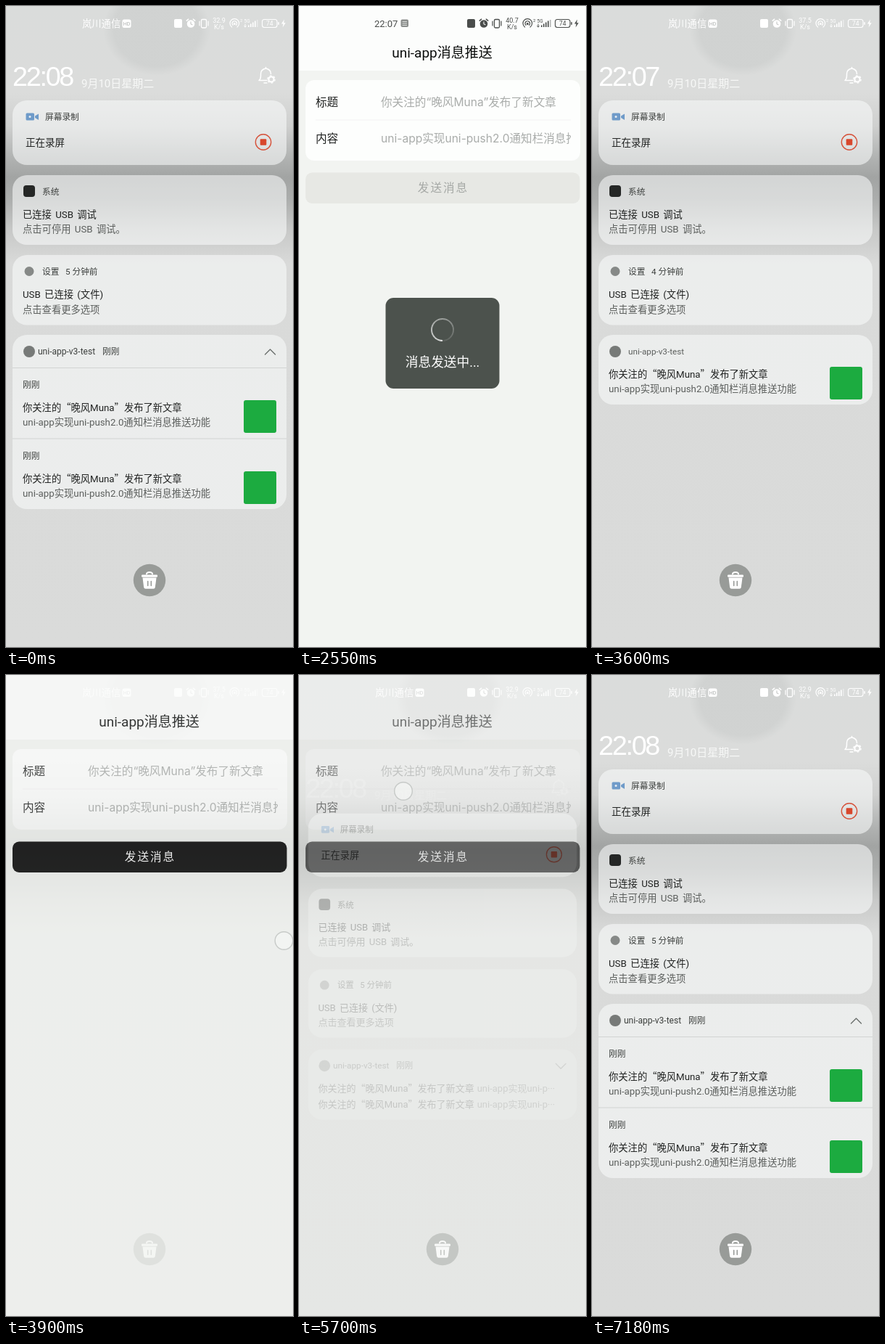
An HTML page for the animation above (7.31 s loop, 396x883 px).

```html
<!DOCTYPE html>
<html lang="zh-CN">
<head>
<meta charset="utf-8">
<title>消息推送</title>
<style>
html, body { margin: 0; width: 100%; height: 100%; overflow: hidden; background: #dadbda; }
svg { display: block; width: 100%; height: 100%; }
text { font-family: Roboto, "Noto Sans CJK SC", "Noto Sans CJK", sans-serif; white-space: pre; }
.inter { font-family: Inter, "Noto Sans CJK SC", "Noto Sans CJK", sans-serif; }
.cjk { font-family: "Noto Sans CJK SC", "Noto Sans CJK", sans-serif; }
.clock { font-family: "Liberation Sans", Arial, sans-serif; letter-spacing: -2.3px; }
.mid { text-anchor: middle; }
.end { text-anchor: end; }
</style>
</head>
<body>
<svg id="stage" viewBox="0 0 396 883" preserveAspectRatio="none"></svg>
<script>
const LOOP = 7310;
const INK = '#202221', SOFT = '#5c5f5d', HINT = '#a9acaa';
const USER = '晚风Muna', CARRIER = '岚川通信';

// Small SVG helpers
const text = (x, y, size, str, fill = INK, cls = '', more = '') =>
  `<text x="${x}" y="${y}" font-size="${size}" fill="${fill}" class="${cls}" ${more}>${str}</text>`;
const rect = (x, y, w, h, r, fill, more = '') =>
  `<rect x="${x}" y="${y}" width="${w}" height="${h}" rx="${r}" fill="${fill}" ${more}/>`;
const disc = (x, y, r, fill, more = '') => `<circle cx="${x}" cy="${y}" r="${r}" fill="${fill}" ${more}/>`;
const ring = (x, y, r, color, w, more = '') => disc(x, y, r, 'none', `stroke="${color}" stroke-width="${w}" ${more}`);
const line = (d, color, w = 1.4, more = '') =>
  `<path d="${d}" fill="none" stroke="${color}" stroke-width="${w}" stroke-linecap="round" stroke-linejoin="round" ${more}/>`;
const group = (body, more) => `<g ${more}>${body}</g>`;
const at = (x, y, body) => group(body, `transform="translate(${x} ${y})"`);

const stops = list => list.map(([y, c]) => `<stop offset="${y / 883}" stop-color="${c}"/>`).join('');
const defs = `<defs>
  <linearGradient id="wall" x2="0" y2="1">${stops([[0, '#dadcdb'], [120, '#dbdcdb'], [165, '#cfd0cf'],
    [205, '#b3b5b4'], [236, '#a2a4a3'], [265, '#abadac'], [310, '#c8c9c8'], [355, '#d9dad9'], [883, '#dadbda']])}</linearGradient>
  <radialGradient id="haze"><stop offset=".8" stop-color="#cfd1d0" stop-opacity=".85"/><stop offset="1" stop-color="#cfd1d0" stop-opacity="0"/></radialGradient>
  <clipPath id="field"><rect x="112.5" y="165" width="262.5" height="35"/></clipPath>
</defs>`;

function statusIcons(c, speed) {
  const bars = [2.5, 4.5, 6.5, 8.5].map((h, i) => rect(334 + i * 3, 29 - h, 1.6, h, 0, c)).join('');
  return rect(232, 18, 11, 12, 2, c) +
    disc(255, 24.5, 5.3, c) + line('M249.3 20.2l2.4-2M260.7 20.2l-2.4-2', c, 1.5) +
    line('M255 21.8v3l2 1', c === '#fff' ? '#c5c7c6' : '#f8f9f8', 1.1) +
    rect(269.5, 18.5, 7, 11.5, 1.5, 'none', `stroke="${c}" stroke-width="1.3"`) +
    line('M267 21v6M279 21v6', c, 1.2) +
    text(294, 22.5, 9, speed, c, 'mid') + text(294, 31.5, 9, 'K/s', c, 'mid') +
    line('M311.6 29a6.3 6.3 0 1 1 7.4 0M313 26.4a3.3 3.3 0 1 1 4.6 0', c, 1.2) + disc(315.3, 24.6, 1.5, c) +
    text(323, 22, 6, '2', c) + text(328.5, 22.5, 6.5, '5G', c) +
    line('M330 25v4M328.7 27.5l1.3 1.5 1.3-1.5', c, .9) + bars + rect(346, 19, 1.6, 10, 0, c, 'opacity=".4"') +
    rect(353.5, 18.5, 20.5, 11, 3, 'none', `stroke="${c}" stroke-width="1.1"`) +
    rect(375.3, 22, 1.5, 4, .7, c) + text(363.7, 27, 8.5, '74', c, 'mid') +
    `<path d="M384 18.5l-4 6h2.6l-1 5 4.2-6.2h-2.6z" fill="${c}"/>`;
}

// The page with its form
function spinner(turn) {
  const point = a => `${(15 * Math.cos(a)).toFixed(2)} ${(15 * Math.sin(a)).toFixed(2)}`;
  let arcs = '';
  for (let i = 0; i < 24; i++) {
    const a = Math.PI * (1 + i / 12);
    arcs += line(`M${point(a)}A15 15 0 0 1 ${point(a + Math.PI / 12)}`, '#fff', 1.9,
      `opacity="${(.8 - i * .031).toFixed(2)}" style="stroke-linecap:butt"`);
  }
  return group(arcs, `transform="translate(198 446) rotate(${turn})"`);
}

function page(s, time) {
  const base = s.keys ? '#f7f9f8' : '#f2f4f1', top = s.keys ? base : '#fcfdfc';
  const dark = '#4a4d4b';
  let out = rect(0, 0, 396, 883, 0, base) + rect(0, 0, 396, 89, 0, top);
  if (!s.panel) {
    out += text(104, 28.7, 13, '22:07', dark) +
      rect(140.5, 18.5, 10.5, 10.5, 2, '#8b8e8c') + line('M143 21.5h5.5M143 24h5.5M143 26.5h5.5', base, .8) +
      (s.sent ? disc(162, 24, 5.5, '#6a6d6b') : '') + statusIcons(dark, s.speed);
  }
  out += text(197.5, 70.5, 19, 'uni-app消息推送', '#0c0e0d', 'mid') +
    rect(9, 102, 379, 111, 12, s.keys ? base : '#fdfefd') +
    (s.keys ? '' : rect(23, 156.5, 352, 1, 0, '#f3f4f3')) +
    text(23, 137.5, 15.6, '标题') + text(23, 187.5, 15.6, '内容') +
    text(113, 137.5, 15.6, `你关注的“${USER}”发布了新文章`, HINT, 'inter') +
    group(text(s.keys ? 374.5 : 113, 187.5, 15.6, 'uni-app实现uni-push2.0通知栏消息推送功能', HINT,
      s.keys ? 'inter end' : 'inter'), 'clip-path="url(#field)"') +
    rect(9, 229.5, 378.5, 42.5, 9, s.load ? '#e7e8e4' : '#000') +
    text(199, 255.8, 15.6, '发送消息', s.load ? '#a5a8a5' : '#fff', 'mid', 'letter-spacing="2"');
  if (s.load) {
    out += rect(119.5, 402, 157, 125, 11, '#4c524d') + spinner((time - 4800) * .36) +
      text(198, 497, 17.7, '消息发送中...', '#fff', 'mid');
  }
  return out + (s.keys ? keyboard() : '');
}

function keyboard() {
  const cap = (x, y, w, fill = '#f8faf9') => rect(x, y + 1, w, 49, 5, '#cfd3d9') + rect(x, y, w, 48.5, 5, fill);
  const grey = '#c6ced8', ink = '#2b2d2f', tool = '#55585a';
  const row = (x0, y, letters, hints) => [...letters].map((ch, i) => {
    const x = x0 + i * 40;
    return cap(x - 17, y, 34.5) + text(x, y + 33.5, 20, ch, ink, 'inter mid') + text(x, y + 13.5, 10.5, hints[i], '#b7babc', 'mid');
  }).join('');
  const eye = 'M0 0q1 6 5.5 6t5.5-6M3.6 11v4M7.4 11v4';
  const bar =
    disc(372, 590, 10.5, '#fff') + disc(372, 590, 8, '#d9843f') +
    text(16, 633, 20, '，', ink, 'cjk') + text(65, 634, 20, '不能', ink) +
    disc(143, 626, 13.3, '#fbc83d') + disc(137.5, 623, 1.6, '#6b4420') + disc(148.5, 623, 1.6, '#6b4420') +
    disc(134.5, 629, 2.6, '#f6a13c') + disc(151.5, 629, 2.6, '#f6a13c') +
    line('M136.5 629.5q6.5 7.5 13 0', '#7a4a1c', 1.6) +
    text(180, 637, 22, '*', ink) + at(190, 627, line(eye, ink)) + at(209, 627, line(eye, ink)) +
    line('M202.5 636.5l2.3 2 2.3-2', ink, 1.2) +
    line('M229 632c-9 3-10-8-5-8 4 0 5 4 5 8 0-4 1-8 4.5-8 5 0 5 11-4.5 8', ink) +
    text(259.5, 634, 20, '到', ink) + line('M303.5 616v20', '#dddfe0', 1) +
    ring(327, 625, 9, tool, 1.4) + line('M333.5 631.5l3.5 3.5', tool) +
    ring(372, 626, 9.7, tool, 1.4) + line('M368.5 622.5l7 7M375.5 622.5l-7 7', tool);
  return bar + rect(0, 650, 396, 233, 0, '#e4e7ec') +
    row(18, 656, 'QWERTYUIOP', '1234567890') +
    row(38, 715, 'ASDFGHJKL', '~!@#%“”*?') +
    row(78, 774, 'ZXCVBNM', '()-_:;/') +
    cap(0, 774, 56, grey) + line('M28 790l-9.5 9h5v8h9v-8h5z', ink, 1.7) +
    cap(341, 774, 55, grey) + line('M357 799l6-7.5h16v15h-16zM367 795.5l7 7M374 795.5l-7 7', ink, 1.6) +
    cap(0, 834, 56, grey) + text(28, 864.5, 18.5, '符', ink, 'mid') +
    cap(60, 834, 43.5, grey) + text(66, 858, 18.5, '中', ink) + line('M71.5 872l22-22', '#8d949c', 1) + text(84, 872.5, 13.5, '英', '#8d949c') +
    cap(109, 834, 34.5) + text(122.5, 863, 20, '，', ink, 'cjk') +
    cap(149, 834, 98.5) + rect(194.5, 844, 7, 11, 3.5, 'none', 'stroke="#c3c6c8"') + line('M191.5 851q0 7 6.5 7t6.5-7M198 858v3', '#c3c6c8', 1) +
    line('M181 866v2.5q0 2 2 2h30q2 0 2-2v-2.5', ink, 1.7) +
    cap(253, 834, 34.5) + text(266, 864, 20, '。', ink, 'cjk') +
    cap(293, 834, 43, grey) + text(314.5, 865, 18, '123', ink, 'inter mid') +
    cap(341, 834, 55, grey) + line('M379 852v6.5h-21M363 853.5l-5 5 5 5', ink, 1.7);
}

// The notification panel
const headline = `你关注的<tspan class="cjk">“</tspan>${USER}<tspan class="cjk">”</tspan>发布了新文章`;
const summary = 'uni-app实现uni-push2.0通知栏消息推送功能';
const label = (x, y, str, fill = '#3c3f3d') => text(x, y, 11.7, str, fill);
const body = (y, str, fill, more) => text(23, y, 13.3, str, fill, '', more);
const entry = y => body(y, headline) + body(y + 20.5, summary, SOFT) + rect(328, y - 14.5, 45, 45, 3, '#1cab40');
const wide = 'word-spacing="2"';

const recording = rect(27.5, 17.5, 11.5, 10, 1.5, '#6f9bc9') + '<path d="M40 21.5l5-3v8.5l-5-3z" fill="#6f9bc9"/>' + disc(33, 22.5, 1.5, '#e8edf2') +
  label(54, 26.7, '屏幕录制') + text(27, 63, 13.5, '正在录屏') +
  ring(355, 57.5, 10.7, '#d6533c', 1.4) + rect(350.7, 53.2, 8.6, 8.6, 1, '#d8472c');
const system = rect(24, 14, 16, 16, 4, '#252726') + label(50, 26.5, '系统') +
  body(58.5, '已连接 USB 调试', INK, wide) + body(79, '点击可停用 USB 调试。', SOFT, wide);
const settings = min => disc(32, 22.5, 6.5, '#868987') + label(50, 26.7, '设置') + label(82, 26.7, min + ' 分钟前') +
  body(59, 'USB 已连接 (文件)', INK, wide) + body(79.5, '点击查看更多选项', SOFT);

// k runs from 0 (folded) to 1 (unfolded); without it there is a single message
function messages(k) {
  const mark = disc(32, 23, 8, '#777a78');
  if (k === undefined) return mark + label(50, 26.5, 'uni-app-v3-test', SOFT) + entry(58.5);
  const brief = y => body(y, `${headline}<tspan dx="4" fill="${SOFT}">uni-app实现uni-p···</tspan>`);
  const rule = y => rect(9, y, 378, 1, 0, '#d2d4d3');
  const tip = k < .5 ? 27 : 20, edge = 47 - tip;
  return mark + text(44, 27.2, 12, 'uni-app-v3-test', '#3c3f3d') + label(133, 27, '刚刚') +
    line(`M357.5 ${edge}L364.5 ${tip}L371.5 ${edge}`, '#6d706e') +
    (k < 1 ? group(brief(59.5) + brief(82), `opacity="${1 - k}"`) : '') +
    (k > 0 ? group(rule(45) + label(23, 72.7, '刚刚') + entry(104.5) + rule(142.5) + label(23, 170.7, '刚刚') + entry(202.5),
      `opacity="${k}"`) : '');
}

const bell = line('M349 102.5q2.5-2 2.5-6v-3q0-6 7-7.5 7 1.5 7 7.5M349 102.5h11M356 106h4M358.5 84.5v1.5', '#fff', 1.5) +
  ring(366, 101, 3.6, '#fff', 2.2) + ring(366, 101, 5.2, '#fff', 1.2, 'stroke-dasharray="2.7 2.7"');
const trash = disc(198, 791, 22.2, '#989b98') + rect(187, 783.5, 22, 3.2, 1.2, '#fff') + line('M194 782.5q0-2.5 4-2.5t4 2.5', '#fff', 2) +
  '<path d="M188.5 787.5h19l-1.7 13.2q-.3 2-2.3 2h-11q-2 0-2.3-2z" fill="#fff"/>' + line('M195.7 792.5v6M200.3 792.5v6', '#989b98', 1.6);

function panel(s) {
  const { y = 0, gap = 0, show = 1, k } = s;
  const cards = [
    [130, 89, recording], [233, 96, system], [343, 96.5, settings(s.min)],
    [453, k === undefined ? 96 : 99 + 141 * k, messages(k)],
  ].map(([top, h, content], i) => {
    const scale = 1 - (1 - show) * .03, cy = h / 2;
    const alpha = show ? 1 - (1 - show) * (.5 + i * .17) : 0;
    return group(`<clipPath id="card${i}">${rect(9, 0, 378, h, 20, '#fff')}</clipPath>` +
      rect(9, 0, 378, h, 20, '#fafcfb', 'fill-opacity=".57"') + group(content, `clip-path="url(#card${i})"`),
      `opacity="${alpha}" transform="translate(198 ${top + y + gap * i + cy}) scale(${scale}) translate(-198 ${-cy})"`);
  }).join('');
  const head = text(9, 109.7, 37.8, s.clock, '#fff', 'clock') + text(104, 111.5, 15, '9月10日星期二', '#f7f8f7') + bell;
  const headAlpha = show && Math.max(0, 1 - (1 - show) * 1.25);
  return group(
    rect(0, 0, 396, 883, 0, '#dadcdb') + at(0, y * .1, rect(0, 0, 396, 883, 0, 'url(#wall)')) +
    '<ellipse cx="208" cy="32" rx="74" ry="64" fill="url(#haze)"/>' +
    text(105, 29, 13.3, CARRIER, '#fff') + rect(160.5, 18.5, 12, 11.5, 2.5, '#fff') + text(166.5, 27, 7, 'HD', '#aeb0af', 'mid') +
    statusIcons('#fff', s.speed) +
    group(head, `opacity="${headAlpha}" transform="translate(0 ${y - gap * 1.4})"`) + cards + trash,
    `opacity="${s.panel}"`);
}

const touch = ([x, y]) => disc(x, y, 12.3, '#f6f8f7', 'fill-opacity=".6" stroke="#b9bdbb" stroke-opacity=".75" stroke-width="1.4"');

// Start time and state of every step
const early = { panel: 1, clock: '22:07', min: 4, speed: '37.5' };
const late = { panel: 1, clock: '22:08', min: 5, speed: '32.9', k: 0 };
const typed = { speed: '40.7' }, idle = { speed: '21.1', sent: 1 };
const sending = [4350, 4500, 4650, 4800, 4950, 5100].map(time => [time, { ...idle, load: 1 }]);
const steps = [
  [0, { ...late, k: 1 }],
  [1950, { ...typed, keys: 1 }],
  [2100, typed],
  [2250, { ...typed, touch: [230, 250] }],
  [2400, { ...typed, load: 1 }],
  [2550, { ...typed, load: 1 }],
  [2700, { ...typed, load: 1 }],
  [2850, { ...typed, sent: 1 }],
  [3000, { ...early, panel: .5, y: 60, gap: .6, show: .35, touch: [144, 160] }],
  [3150, { ...early, y: 152, gap: 1.4, show: .66, touch: [144, 305] }],
  [3300, { ...early, y: 4, gap: 2 }],
  [3450, early],
  [3750, { ...early, touch: [390, 366] }],
  [3900, { ...early, panel: .2, show: 0, touch: [383.5, 366] }],
  [4050, idle],
  [4200, { ...idle, touch: [230, 250] }],
  ...sending,
  [5250, idle],
  [5700, { ...late, panel: .5, y: 60, gap: .6, show: .35, touch: [144, 160] }],
  [5850, { ...late, y: 130, gap: 1.4, show: .6, touch: [144, 280] }],
  [6000, { ...late, y: 148, gap: 1.5 }],
  [6150, { ...late, y: 4, gap: 2 }],
  [6300, { ...late, y: 1, gap: .5 }],
  [6450, late],
  [6750, { ...late, k: .35 }],
  [6900, { ...late, k: .75 }],
  [7050, { ...late, k: .95 }],
  [7180, { ...late, k: 1 }],
];

const stage = document.getElementById('stage');
const start = performance.now();
let current = -1;

function tick() {
  const now = (performance.now() - start) % LOOP;
  const index = steps.findLastIndex(([from]) => from <= now);
  if (index !== current) {
    current = index;
    const [time, s] = steps[index];
    stage.innerHTML = defs + (s.panel === 1 ? '' : page(s, time)) +
      (s.panel ? panel(s) : '') + (s.touch ? touch(s.touch) : '');
  }
  requestAnimationFrame(tick);
}
tick();
</script>
</body>
</html>
```
